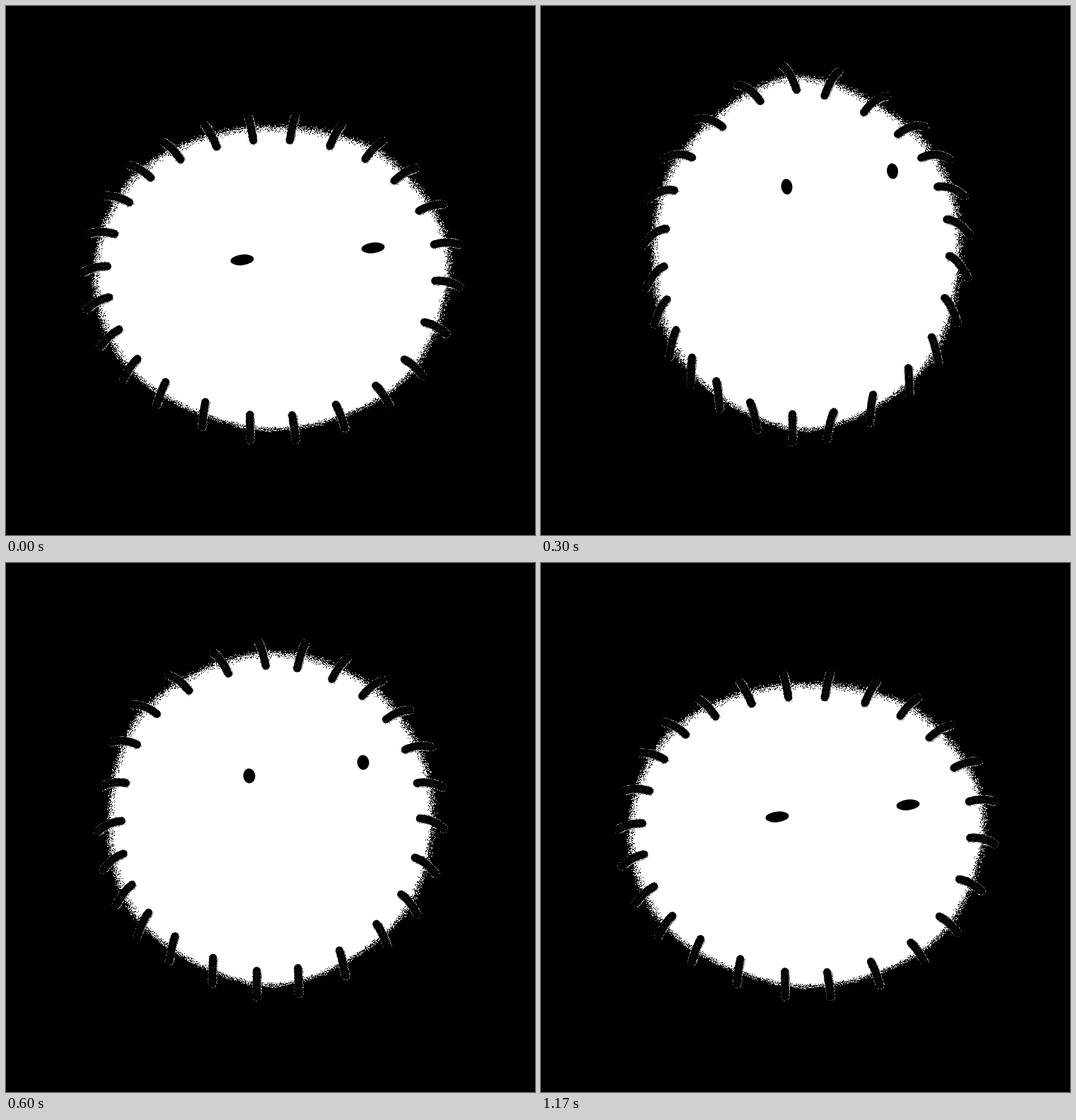
Write an HTML page with a canvas that moves like this. It is 748 px wide and 748 px high and loops after 1240 ms.

```html
<!DOCTYPE html>
<html lang="en">
<head>
<meta charset="utf-8">
<title>Bouncing fuzzball</title>
<style>
html, body { margin: 0; width: 100%; height: 100%; overflow: hidden; background: #000; }
canvas { display: block; }
</style>
</head>
<body>
<canvas id="stage" width="748" height="748"></canvas>
<script>
const ctx = document.getElementById('stage').getContext('2d');
const KNOTS = 8, HAIRS = 25, LOOP = 1240;

// rim: eight points of the outline, clockwise from the top.
// droop: how far the hairs hang down, in degrees.
// eyes: both centres; eye: radii.
const squash = {
  rim: [346,173, 526,207, 625,350, 562,528, 376,598, 190,527, 126,384, 185,238],
  droop: [10], eyes: [334,359, 519,342], eye: [16.5, 7.5]
};
const stretch = {
  rim: [352,89, 530,177, 584,323, 540,506, 388,600, 234,534, 170,399, 191,223],
  droop: [55], eyes: [345,226, 486,203], eye: [7.5, 12]
};
const rebound = {
  rim: [351,114, 527,184, 598,329, 551,504, 376,596, 216,525, 155,393, 189,219],
  droop: [37], eyes: [350,285, 508,264], eye: [8.5, 10]
};
const round = {
  rim: [362,128, 523,181, 601,327, 558,500, 384,596, 207,524, 147,385, 192,212],
  droop: [20], eyes: [344,301, 505,282], eye: [8.5, 10.5]
};
const sink = {
  rim: [362,158, 521,201, 611,337, 561,510, 372,590, 189,520, 132,383, 210,217],
  droop: [6], eyes: [335,337, 515,322], eye: [11.5, 8]
};

const halfway = (a, b) => Object.fromEntries(Object.keys(a).map(
  key => [key, a[key].map((v, i) => (v + b[key][i]) / 2)]));

const steps = [
  [0, squash], [100, halfway(squash, stretch)], [170, stretch],
  [300, halfway(stretch, rebound)], [400, rebound], [600, round],
  [800, halfway(round, sink)], [970, sink], [1170, squash]
];

let seed;
function random() {
  seed = (seed * 1664525 + 1013904223) >>> 0;
  return seed / 4294967296;
}

function dot(x, y, gray) {
  ctx.fillStyle = `rgb(${gray},${gray},${gray})`;
  ctx.fillRect(Math.round(x), Math.round(y), 1, 1);
}

// Closed Catmull-Rom curve through the rim, with its outward normal.
function rimAt(rim, u) {
  const i = Math.floor(u), t = u - i;
  const axis = o => {
    const [a, b, c, d] = [-1, 0, 1, 2].map(k => rim[(i + k + KNOTS) % KNOTS * 2 + o]);
    const p = c - a, q = 2 * a - 5 * b + 4 * c - d, r = 3 * (b - c) + d - a;
    return [b + (p * t + q * t * t + r * t ** 3) / 2, p + 2 * q * t + 3 * r * t * t];
  };
  const [x, dx] = axis(0), [y, dy] = axis(1), l = Math.hypot(dx, dy);
  return { x, y, nx: dy / l, ny: -dx / l };
}

function drawBody({ rim }) {
  const edge = [];
  for (let u = 0; u < KNOTS; u += 0.01) edge.push(rimAt(rim, u));
  ctx.fillStyle = '#fff';
  ctx.beginPath();
  edge.forEach(p => ctx.lineTo(p.x, p.y));
  ctx.fill();

  // Sprayed edge: white grains outside, black grains inside.
  for (let i = 0; i < 4500; i++) {
    const p = edge[Math.floor(random() * edge.length)];
    const away = (random() + random() - 1) * (p.ny > 0.6 ? 4 : 7);
    const slide = random() * 4 - 2;
    dot(p.x + p.nx * away - p.ny * slide, p.y + p.ny * away + p.nx * slide,
      away > 0 ? 255 : 0);
  }
}

function drawHair({ rim, droop: [droop] }, k) {
  const { x, y } = rimAt(rim, k * KNOTS / HAIRS);
  const turn = (k - 0.5) * 2 * Math.PI / HAIRS;
  const angle = turn + Math.cbrt(Math.sin(turn)) * droop * Math.PI / 180;
  const half = 17 + droop * 0.06, sag = 4 + droop / 7;
  const dx = Math.sin(angle) * half, dy = -Math.cos(angle) * half;
  const grains = (count, near, far, dark, light) => {
    for (let j = 0; j < count; j++) {
      const t = random(), a = random() * 2 * Math.PI;
      const r = near + (far - near) * random();
      dot(x + dx * (2 * t - 1) + Math.cos(a) * r,
        y + dy * (2 * t - 1) - 2 * t * (1 - t) * sag + Math.sin(a) * r,
        dark + (light - dark) * random());
    }
  };
  grains(420, 5.6, 6.6, 60, 220);
  ctx.lineWidth = 11;
  ctx.beginPath();
  ctx.moveTo(x - dx, y - dy);
  ctx.quadraticCurveTo(x, y - sag, x + dx, y + dy);
  ctx.stroke();
  grains(60, 0, 4.5, 0, 45);
}

function drawEyes({ eyes, eye: [rx, ry] }) {
  ctx.fillStyle = '#000';
  for (const o of [0, 2]) {
    ctx.beginPath();
    ctx.ellipse(eyes[o], eyes[o + 1], rx, ry, -0.1, 0, 2 * Math.PI);
    ctx.fill();
  }
}

function draw(pose) {
  seed = 7;
  ctx.fillStyle = ctx.strokeStyle = '#000';
  ctx.lineCap = 'round';
  ctx.fillRect(0, 0, 748, 748);
  drawBody(pose);
  for (let k = 0; k < HAIRS; k++) drawHair(pose, k);
  drawEyes(pose);
}

let shown;
function tick() {
  const time = performance.now() % LOOP;
  const pose = steps.filter(([start]) => start <= time).pop()[1];
  if (pose !== shown) draw(shown = pose);
  requestAnimationFrame(tick);
}
tick();
</script>
</body>
</html>
```
